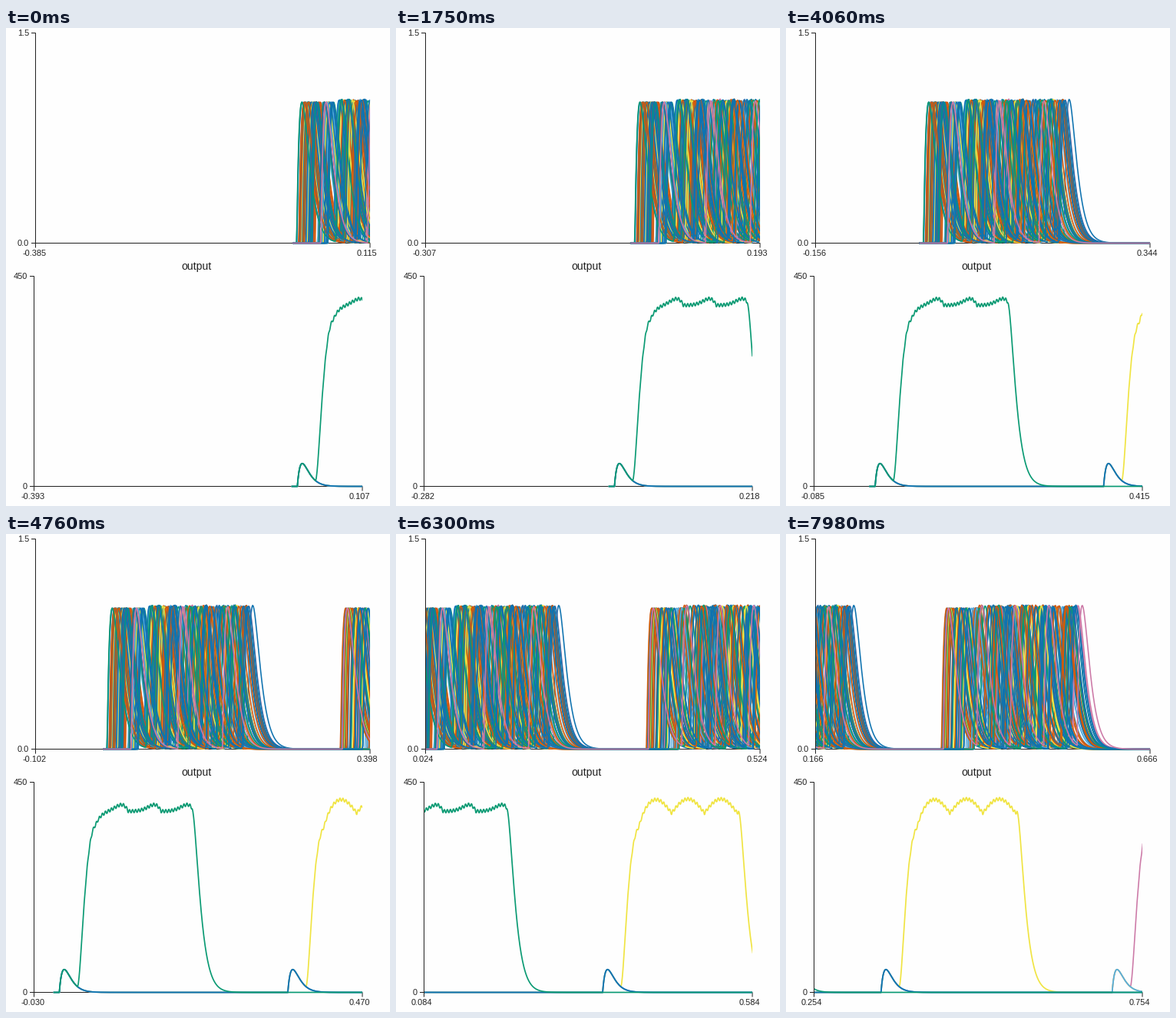
Animation of 500x621 px, one loop 8 s. Source, as a matplotlib script:

```python
import matplotlib.pyplot as plt
import numpy as np
from matplotlib.animation import FuncAnimation

W, H, DPI = 500, 621, 64
PT = 72 / DPI  # points per pixel
LOOP, INTERVAL, TICK = 8000, 40, 70
SPAN = 0.5
INK = "#222222"

BLUE, ORANGE, GREEN = "#0f73b0", "#d2590c", "#0a9a73"
YELLOW, SKY, PINK = "#f0e442", "#56ade0", "#cc79a7"

# The charts stand still between these pairs of redraws.
PAIRS = (910, 980, 1260, 1680, 2170, 2730, 3360, 3990, 4690, 4900, 5390,
         6300, 7070, 7280, 7840, 7910)
REDRAWS = np.array(sorted({*range(0, 631, TICK), *PAIRS,
                           *(p + TICK for p in PAIRS)}))

# Loop time, left edge of the input window, left edge of the output window.
KEYS = np.array([(0, -0.385, -0.393), (1050, -0.347, -0.328),
                 (2800, -0.248, -0.213), (4060, -0.156, -0.085),
                 (5460, -0.047, 0.024), (6300, 0.024, 0.084),
                 (7980, 0.166, 0.254)]).T

plt.rcParams["font.family"] = "Liberation Sans"
fig = plt.figure(figsize=(W / DPI, H / DPI), dpi=DPI, facecolor="#fefefe")
base = fig.add_axes([0, 0, 1, 1], zorder=0)
base.set(xlim=(0, W), ylim=(H, 0))
base.axis("off")


def label(x, y, text, size=11, ha="left"):
    return base.text(x, y, text, fontsize=size * PT, color=INK, ha=ha,
                     va="baseline")


def rule(xs, ys):
    base.plot(xs, ys, color=INK, lw=PT, solid_capstyle="butt",
              solid_joinstyle="miter", snap=False)


class Panel:
    """Chart with a sliding time window, placed in stage pixels."""

    PAD = 3

    def __init__(self, x0, x1, y_top, y_zero, top, names, label_x, lefts):
        height = y_zero - y_top
        self.ax = fig.add_axes([x0 / W, 1 - (y_zero + self.PAD) / H,
                                (x1 - x0) / W, (height + self.PAD) / H],
                               zorder=1)
        self.ax.set_ylim(-self.PAD * top / height, top)
        self.ax.axis("off")
        rule([x0 - 5.5, x0, x0, x0 - 5.5], [y_top, y_top, y_zero, y_zero])
        rule([x0, x0, x1, x1], [y_zero + 6, y_zero, y_zero, y_zero + 6])
        for name, y in zip(names, (y_top, y_zero)):
            label(x0 - 8.5, y + 3.6, name, ha="right")
        self.ends = [label(x, y_zero + 17, "") for x in label_x]
        self.lefts = lefts

    def plot(self, t, values, color, width):
        self.ax.plot(t, values, color=color, lw=width * PT)

    def slide(self, time):
        left = np.interp(time, KEYS[0], self.lefts)
        self.ax.set_xlim(left, left + SPAN)
        for text, value in zip(self.ends, (left, left + SPAN)):
            text.set_text(f"{value:.3f}")


def alpha(s, tau):
    """Pulse that peaks at 1 after tau."""
    u = np.maximum(s, 0) / tau
    return u * np.exp(1 - u)


def smooth_step(s, tau):
    u = np.maximum(s, 0) / tau
    return 1 - (1 + u) * np.exp(-u)


# Input: neurons firing in two bursts.
NEURONS, PERIOD = 68, 0.05
PALETTE = (BLUE, ORANGE, SKY, GREEN, YELLOW, PINK)
SHARES = (0.27, 0.23, 0.17, 0.17, 0.08, 0.08)


def spike_train(rng, start, end, closes_burst):
    if closes_burst:
        return np.arange(end, start, -PERIOD)[::-1]
    gaps = rng.uniform(0.95 * PERIOD, 1.45 * PERIOD, 5)
    spikes = start + rng.uniform(0, PERIOD) + np.append(0, np.cumsum(gaps))
    return spikes[spikes < end - 0.005]


def draw_inputs(panel):
    rng = np.random.default_rng(11)
    t = np.arange(0, 0.7, 0.001)
    colors = rng.choice(PALETTE, NEURONS, p=SHARES)
    colors[0], colors[-1] = BLUE, PINK
    bursts = ((0.005, 0.2155, 0), (0.354, 0.557, NEURONS - 1))
    for i, color in enumerate(colors):
        values = np.zeros_like(t)
        for start, end, closer in bursts:
            for k, spike in enumerate(spike_train(rng, start, end, i == closer)):
                values += (1.015 if k else 1.007) * alpha(t - spike, 0.0077)
        panel.plot(t, values, str(color), 1.6)


# Output: every stimulus nudges all outputs, then one of them wins.
ONSETS = (0.008, 0.356, 0.708)


def bumps(t, count):
    return sum(49 * alpha(t - onset, 0.0075) for onset in ONSETS[:count])


def response(t, onset, fall, level, swing, skew):
    """Rise to a plateau that swings once per firing period, then decay."""
    s = t - onset
    held = np.minimum(s, fall)
    phase = (held - 0.105) / PERIOD % 1
    plateau = (level + swing * np.sin(np.pi * phase ** skew)
               + 3.5 * np.sin(2 * np.pi * held / 0.0046))
    return plateau * (smooth_step(s - 0.0275, 0.0066) - smooth_step(s - fall, 0.0075))


def draw_outputs(panel):
    t = np.arange(0, 0.76, 0.0005)
    one, two, three = ONSETS
    panel.plot(t, bumps(t, 3) + response(t, three, 0.2, 388, 14, 3), PINK, 1.6)
    panel.plot(t, bumps(t, 3) + response(t, two, 0.207, 384, 30, 1), YELLOW, 1.7)
    panel.plot(t, bumps(t, 3), SKY, 1.8)
    panel.plot(t, bumps(t, 2), BLUE, 1.8)
    panel.plot(t, bumps(t, 1) + response(t, one, 0.202, 388, 14, 3), GREEN, 1.7)


inputs = Panel(38.5, 474, 6.5, 279.5, 1.5, ("1.5", "0.0"), (21.6, 456.7), KEYS[1])
outputs = Panel(36.5, 464, 322.5, 595.5, 450, ("450", "0"), (19.6, 446.8), KEYS[2])
label(248.3, 314, "output", 14, "center")
draw_inputs(inputs)
draw_outputs(outputs)


def update(frame):
    time = round(frame * INTERVAL / TICK) * TICK
    shown = REDRAWS[REDRAWS <= time][-1]
    inputs.slide(shown)
    outputs.slide(shown)
    return []


anim = FuncAnimation(fig, update, frames=LOOP // INTERVAL, interval=INTERVAL,
                     repeat=True, repeat_delay=0, blit=False)
plt.show()
```
